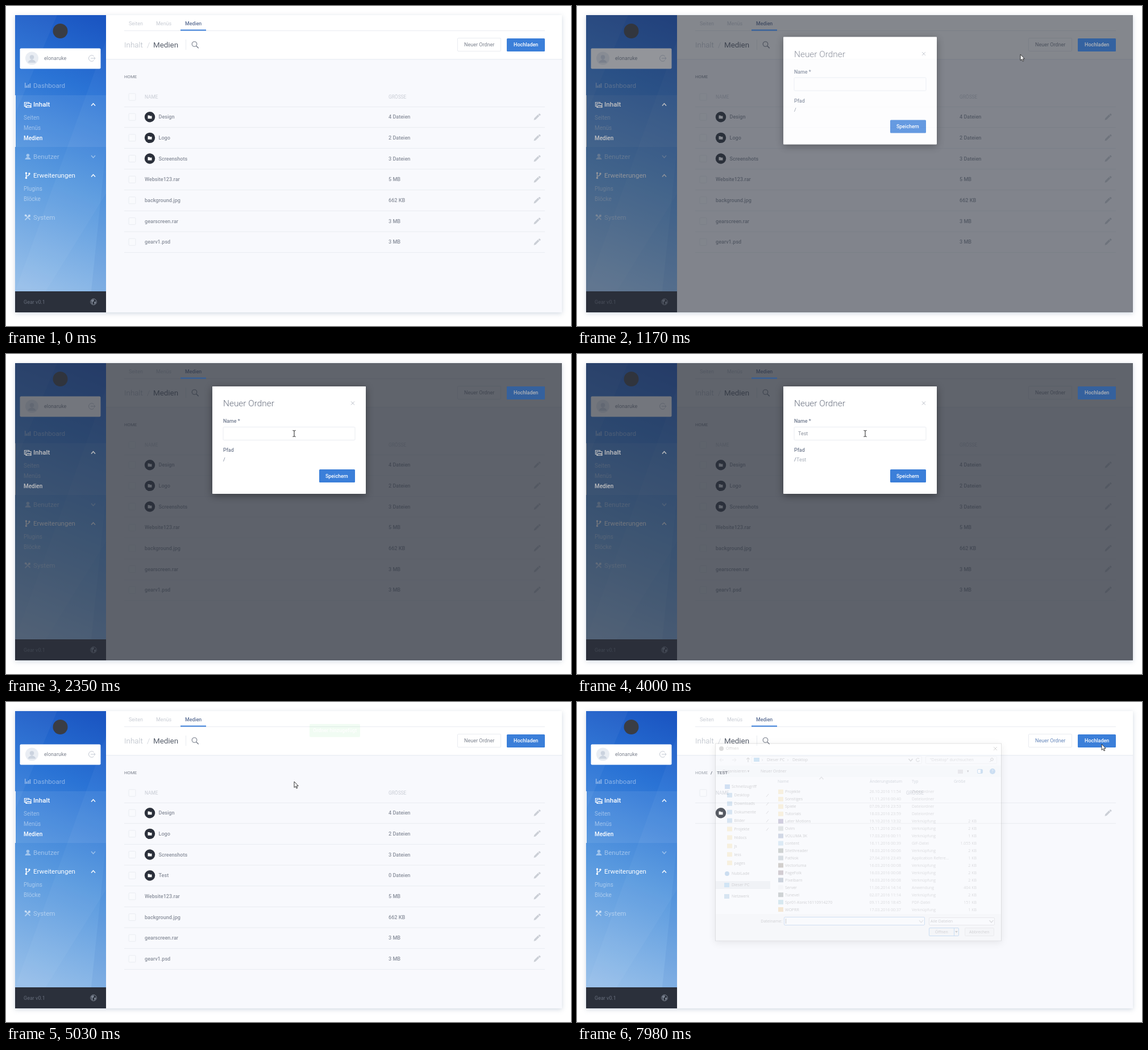
These frames come from a looping animation (994 by 563 pixels, 8 s). An HTML page:

```html
<!DOCTYPE html>
<html lang="de">
<head>
<meta charset="utf-8">
<title>Medien</title>
<style>
  html, body { margin: 0; height: 100%; overflow: hidden; background: #fff; }
  svg { display: block; width: 100vw; height: 100vh; font-family: Roboto, sans-serif; }
  #dialog { font-family: "Open Sans", "Noto Sans", sans-serif; }
  .card { filter: drop-shadow(0 2px 4px rgba(70, 100, 140, .25)); }
  .popup { filter: drop-shadow(0 3px 7px rgba(0, 0, 0, .4)); }
</style>
</head>
<body>
<svg id="stage" viewBox="0 0 994 563"></svg>
<script>
const INK = '#2b303b', BLUE = '#3b7fd9', GREY = '#8a909c', PALE = '#c8ccd4', LINE = '#e9ecf1', DIM = 'rgba(255,255,255,.45)';

// y is the middle of the capital letters
const text = (x, y, s, size, fill, weight = 400, extra = '') =>
  `<text x="${x}" y="${y + size * .355}" font-size="${size}" fill="${fill}" font-weight="${weight}" ${extra}>${s}</text>`;
const rect = (x, y, w, h, fill, extra = '') =>
  `<rect x="${x}" y="${y}" width="${w}" height="${h}" fill="${fill}" ${extra}/>`;
const circle = (x, y, r, fill, extra = '') => `<circle cx="${x}" cy="${y}" r="${r}" fill="${fill}" ${extra}/>`;
const stroke = (d, color, width = 1) => `<path d="${d}" fill="none" stroke="${color}" stroke-width="${width}"/>`;
const fill = (d, color) => `<path d="${d}" fill="${color}"/>`;
const group = (id, body, extra = '') => `<g id="${id}" ${extra}>${body}</g>`;
const box = (x, y, w, h, border, bg = '#fff') => rect(x + .5, y + .5, w - 1, h - 1, bg, `rx="1.5" stroke="${border}"`);
const chevron = (x, y, dir, color) => stroke(`M${x - 3.5} ${y - 2 * dir}l3.5 ${4 * dir}l3.5 ${-4 * dir}`, color, 1.4);
const person = (x, y, s, color) =>
  circle(x, y - 2.2 * s, 2.8 * s, color) + fill(`M${x - 5 * s} ${y + 5 * s}q0 ${-3 * s} ${5 * s} ${-4.5 * s}q${5 * s} ${1.5 * s} ${5 * s} ${4.5 * s}z`, color);

// Elements that stay bright behind the overlay
const bright = () =>
  rect(307, 41.5, 45, 2, BLUE) +
  rect(881, 57, 67, 23, BLUE, 'rx="1.5"') + text(893, 68, 'Hochladen', 9, '#fff', 500) +
  stroke('M34.5 176.5h-2v-7h8v1.5M35 171.500h9v7h-9zM36 178l2.500-3.500 2 2 1.500-1.500 2 3', '#fff', 1.2) +
  text(48, 173, 'Inhalt', 11.6, '#fff', 500) + chevron(153.5, 173.500, -1, '#fff') +
  text(31, 232, 'Medien', 10, '#fff', 500);

const sidebar = () =>
  rect(16, 16, 160, 523, 'url(#sky)') +
  fill('M16 16H90L16 190z', 'rgba(255,255,255,.04)') + fill('M176 60V330L70 502H16z', 'rgba(255,255,255,.035)') +
  fill('M176 250V502H150z', 'rgba(20,80,180,.08)') +
  rect(16, 157, 160, 91, 'rgba(255,255,255,.07)') + rect(16, 157, 1, 91, '#fff') +
  circle(95.5, 44, 13, '#3a3d44') +
  rect(24.5, 74.5, 142, 36, '#fff', 'rx="2"') + circle(45.5, 92, 11.5, '#e9edf3') + person(45.5, 93, 1.35, '#cbd3df') +
  text(67, 92, 'elonaruke', 9, '#7c828e') +
  stroke('M154.500 88.200a5.300 5.300 0 1 0 0 7.600M149 92h8m-2.300-2.300l2.300 2.300-2.300 2.300', '#c3c9d3') +
  fill('M33 135h1.500v9H33zM35.500 140h2v4h-2zM38.500 138h2v6h-2zM41.500 136h1.800v8h-1.800z', DIM) +
  text(48, 140, 'Dashboard', 11.6, DIM) +
  text(31, 196, 'Seiten', 10, DIM) + text(31, 214, 'Menüs', 10, DIM) +
  person(38.5, 265, 1, DIM) + text(48, 265, 'Benutzer', 11.6, DIM) + chevron(153.5, 265, 1, DIM) +
  circle(35.500, 294, 1.7, '#fff') + circle(35.500, 302.500, 1.7, '#fff') + circle(41, 295, 1.7, '#fff') +
  stroke('M35.500 294v8M35.500 299.500q5-.5 5.500-4', '#fff', 1.4) +
  text(48, 298, 'Erweiterungen', 11.6, '#fff') + chevron(153.5, 298.500, -1, '#fff') +
  text(31, 321, 'Plugins', 10, DIM) + text(31, 339, 'Blöcke', 10, DIM) +
  stroke('M33.500 376.500l8-8M34 367.500l8.500 8.500', DIM, 1.8) + circle(41, 369, 2.2, DIM) + circle(34.500, 368.500, 2, DIM) +
  text(48, 371.500, 'System', 11.6, DIM) +
  rect(16, 502, 160, 37, INK) + text(31, 520.500, 'Gear v0.1', 9, '#656c7a') +
  circle(154, 520.500, 5.3, 'none', 'stroke="#7d8593"') +
  fill('M150 517.500l4-1.500 1 3-3 2 1 3-2 .5zM155 521l3-1.500v3l-2.500 2.500z', '#7d8593');

const header = () =>
  rect(176, 16, 802, 77, '#fff') + rect(176, 93, 802, 1.5, '#eceff5') + rect(208, 43, 740, 1, LINE) +
  text(216, 30.500, 'Seiten', 9, PALE) + text(264, 30.500, 'Menüs', 9, PALE) + text(315, 30.500, 'Medien', 8.8, '#5f7196', 500) +
  text(208, 68, 'Inhalt', 13.4, '#b3b9c3', 300) + text(248, 68, '/', 13.4, PALE, 300) + text(259, 68, 'Medien', 13.4, '#575e6b') +
  rect(316, 59, 1, 18, LINE) + circle(331.500, 67, 4.3, 'none', 'stroke="#737a87" stroke-width="1.1"') +
  stroke('M334.700 70.200l4 4', '#737a87', 1.3) +
  box(794, 56, 77, 24, LINE) + text(806, 68, 'Neuer Ordner', 9, '#7b818d', 400, 'id="newFolder"');

const folder = (x, y) => circle(x, y, 9.200, INK) + fill(`M${x - 3.500} ${y - 2.800}h2.800l1 1h3.200v4.800h-7z`, '#fff');
const pencil = y => fill(`M928.500 ${y + 5.500}l.8-3.300 6.500-6.500 2.500 2.500-6.500 6.500zM936.500 ${y - 4.500}l1.200-1.200q1-.6 1.800.2l.6.6q.8.8.2 1.700l-1.200 1.200z`, '#cbcfd6');

function table(rows, sizeX) {
  const check = y => box(215.500, y - 6.500, 13, 13, LINE, '#f9fafd');
  let out = check(160) + text(244, 160, 'NAME', 8.4, PALE) + text(sizeX, 160, 'GRÖSSE', 8.4, PALE) + rect(208, 177, 740, 1, LINE);
  rows.forEach(([name, size], i) => {
    const y = 195.200 + i * 36.670, isFolder = !name || size.endsWith('Dateien');
    if (name) out += check(y);
    if (isFolder) out += folder(253, y);
    out += text(isFolder ? 268.500 : 244, y, name, 9.05, GREY, 500) + text(sizeX, y, size, 9.05, GREY, 500) +
      pencil(y) + rect(208, y + 18, 740, 1, LINE);
  });
  return out;
}
const folders = [['Design', '4 Dateien'], ['Logo', '2 Dateien'], ['Screenshots', '3 Dateien']];
const files = [['Website123.rar', '5 MB'], ['background.jpg', '662 KB'], ['gearscreen.rar', '3 MB'], ['gearv1.psd', '3 MB']];
const home = text(208, 124, 'HOME', 7.8, '#757b87');

const modal = () =>
  rect(363, 57, 270, 189, '#fff', 'rx="2" class="popup"') +
  text(382, 87, 'Neuer Ordner', 15.4, '#6a7180', 300) + stroke('M607 83.500l6 6m0-6l-6 6', '#b9bec7') +
  text(382, 118, 'Name *', 8.9, '#717b8f', 500) + box(381.500, 128, 233, 24, LINE) +
  text(389, 140, '', 9, GREY, 400, 'id="typed"') + rect(389, 135, 1, 11, '#555', 'id="caret"') +
  text(382, 169, 'Pfad', 8.9, '#717b8f', 500) + text(382, 185.500, '/', 9, '#717b8f') +
  text(386, 185.500, '', 9, '#a9b0ba', 400, 'id="path"') +
  rect(551, 203, 63, 23, BLUE, 'rx="1.500"') + text(562, 214.500, 'Speichern', 8.9, '#fff', 500);

// name | date | type (default: link) | size | icon colour
const entries = `Projekte|26.10.2016 11:54|Dateiordner
Sonstiges|11.11.2016 00:40|Dateiordner
Spiele|07.09.2016 23:53|Dateiordner
Tutorials|18.03.2016 23:59|Dateiordner
Later Motions|19.10.2016 13:32||2 KB|#3b2a6a
Ovim|15.11.2016 20:43||2 KB|#8a9a94
VOLUMA 3K|17.03.2016 00:11||1 KB|#3b5b8c
content|16.11.2016 00:39|GIF-Datei|1.055 KB|#6fb4d8
Sitethreader|18.03.2016 00:06||2 KB|#2d3b2d
PatNok|27.04.2016 23:49|Application Refere...|1 KB|#5a7080
Vectorluma|16.03.2016 00:08||2 KB|#3a2a10
PageFolk|16.03.2016 00:08||2 KB|#40202c
Pixelbarn|16.03.2016 00:08||2 KB|#1d3b5c
Server|11.06.2014 14:14|Anwendung|404 KB|#e8e8e8
Tunevel|02.07.2016 11:14||2 KB|#30403a
Spr01-Konic16110914270|09.11.2016 18:45|PDF-Datei|151 KB|#5aa8c0
WOPRR|17.03.2016 00:37||1 KB|#e0a030`.split('\n').map(s => s.split('|'));
const places = 'Schnellzugriff,Desktop,Downloads,Dokumente,Bilder,Projekte,htdocs,js,less,pages'.split(',');

function dialog() {
  const t = (x, y, s, color = '#333', extra) => text(x, y, s, 7, color, 400, extra);
  const icon = (x, y, color) => rect(x, y - 4, 9, 8, color);
  let out = rect(243.500, 73, 503, 347, '#fff', 'stroke="#777" class="popup"') +
    circle(254, 82, 4, '#555') + t(262, 82, 'Öffnen') + stroke('M733 79l6 6m0-6l-6 6', '#333') +
    stroke('M258 102h-7l3-3m-3 3l3 3M273 102h7l-3-3m3 3l-3 3', '#bbb') + stroke('M301 106v-8l-3 3m3-3l3 3', '#444') +
    box(307, 95, 300, 14, '#ddd') + rect(311, 98, 10, 7, '#3a9ad8') + t(325, 102, '›') + t(334, 102, 'Dieser PC') + t(370, 102, '›') + t(379, 102, 'Desktop') +
    chevron(587, 102, 1, '#666') + stroke('M602 100a3 3 0 1 0 .5 3', '#555') +
    box(613, 95, 126, 14, '#ddd') + t(621, 102, '"Desktop" durchsuchen', '#777') +
    circle(730, 101, 2.300, 'none', 'stroke="#555"') + stroke('M728.500 103l-2.500 2.500', '#555') +
    rect(244, 112, 502, 20, '#f3f5f8') + t(256, 122, 'Organisieren ▾') + t(323, 122, 'Neuer Ordner') +
    rect(670, 119, 9, 7, '#aaa') + t(686, 122, '▾') + box(704, 118, 10, 8, '#2a80c8') + rect(710, 119, 3, 6, '#2a80c8') +
    circle(731, 122, 5, '#1f78c8') + t(729.500, 122, '?', '#fff') +
    chevron(430, 134, -1, '#999') +
    t(353, 140, 'Name', '#456') + t(515, 140, 'Änderungsdatum', '#456') + t(589, 140, 'Typ', '#456') + t(663, 140, 'Größe', '#456');
  places.forEach((name, i) => {
    const y = 149 + i * 14.900;
    out += icon(i ? 264 : 260, y, i && i < 5 ? '#5a9ac8' : i ? '#f5cf6a' : '#3a80d0') + t(i ? 276.500 : 272, y, name);
    if (i && i < 6) out += stroke(`M333 ${y + 3}l4-5`, '#777');
  });
  out += rect(244, 315, 96, 14, '#d5d9de') + circle(264, 302, 4, '#1f70c0') + t(272, 302, 'NubiLade') +
    icon(259, 322, '#3a9ad8') + t(272, 322, 'Dieser PC') + icon(259, 342, '#5a9ac8') + t(272, 342, 'Netzwerk');
  entries.forEach(([name, date, type, size = '', color = '#f5cf6a'], i) => {
    const y = 158 + i * 12.940;
    out += icon(354, y, color) + t(366, y, name) + t(514.500, y, date, '#666') +
      t(589, y, type || 'Verknüpfung', '#666') + t(703, y, size, '#666', 'text-anchor="end"');
  });
  return out + rect(244, 373, 502, 46.500, '#f0f0f0') +
    t(361, 385.500, 'Dateiname:', '#333', 'text-anchor="end"') + box(364, 378, 248, 15, '#3a80d0') + rect(367, 381, 1, 9, '#222') +
    chevron(605.500, 386, 1, '#999') + box(619, 379, 116, 14, '#aaa') + t(622, 385.500, 'Alle Dateien') + chevron(729, 386, 1, '#777') +
    box(619, 397, 53, 15, '#1f78d0', '#e6e6e6') + t(630, 404.500, 'Öffnen') + rect(663, 398, 1, 13, '#1f78d0') + fill('M665 403h5l-2.500 3z', '#222') +
    box(682, 397, 52, 15, '#bbb', '#e6e6e6') + t(690, 404.500, 'Abbrechen');
}

stage.innerHTML = `<defs>
  <linearGradient id="sky" gradientUnits="userSpaceOnUse" x1="20" y1="490" x2="200" y2="40">
    <stop stop-color="#97bfe9"/><stop offset=".4" stop-color="#5a9adf"/><stop offset=".75" stop-color="#2a73d5"/><stop offset="1" stop-color="#1b56c2"/>
  </linearGradient>
  <clipPath id="frame"><rect x="16" y="16" width="962" height="523"/></clipPath></defs>` +
  rect(16, 16, 962, 523, '#f8f9fd', 'class="card"') +
  group('app',
    rect(176, 16, 802, 523, '#f8f9fd') + header() + sidebar() + bright() +
    group('before', home + table([...folders, ...files], 673)) +
    group('after', home + table([...folders, ['Test', '0 Dateien'], ...files], 673)) +
    group('inside', text(208, 124, 'HOME', 7.8, '#9da3ad') + text(235, 124, '/', 8, '#555c69', 500) +
      text(246, 124, 'TEST', 8, '#555c69', 500) + table([['', '']], 579)) +
    group('toast', rect(534, 56.500, 89, 23, '#42d957', 'rx="2"') + text(540, 68, 'Ordner hinzugefügt', 8.950, '#fff', 500)) +
    group('overlay', rect(16, -100, 160, 739, INK, 'opacity=".66"') +
      `<path d="M176-100H978V639H176ZM363 57H633V246H363Z" fill="${INK}" fill-rule="evenodd" opacity=".75"/>`) +
    group('lit', bright()) + group('modal', modal()), 'clip-path="url(#frame)"') +
  group('dialog', dialog()) +
  group('cursor',
    group('arrow', '<path d="M0 0V10.500L2.400 8.300 4 12 5.700 11.300 4.100 7.700H7.300Z" fill="#fff" stroke="#222" stroke-width=".9"/>') +
    group('beam', stroke('M-2.500-5.500Q0-5.500 0-4.500Q0-5.500 2.500-5.500M0-5V5M-2.500 5.500Q0 5.500 0 4.500Q0 5.500 2.500 5.500', '#222')) +
    group('hand', '<path d="M-1.200 1Q0-1 1.200 1V5.500Q3 5 3.500 6Q5 5.800 5.300 7Q6.800 7 6.600 9L5.500 14.500H-.5L-4.500 9.500Q-4.500 7.500-2.500 8.500L-1.200 9.700Z" fill="#fff" stroke="#222" stroke-width=".9"/>'));

const $ = id => document.getElementById(id);
const show = (id, on) => $(id).style.display = on ? '' : 'none';
const fade = (id, alpha) => { $(id).setAttribute('opacity', alpha); show(id, alpha > 0); };
const move = (id, x, y) => $(id).setAttribute('transform', `translate(${x} ${y})`);
const linear = u => u, smooth = u => u * u * (3 - 2 * u);

// Value at time t from [time, value] keys
function track(t, keys, ease = linear) {
  const i = keys.findIndex(k => k[0] > t);
  if (i === 0) return keys[0][1];
  if (i < 0) return keys[keys.length - 1][1];
  const [t0, a] = keys[i - 1], [t1, b] = keys[i];
  return a + (b - a) * ease((t - t0) / (t1 - t0));
}

const bursts = [[140, 780, 9], [1010, 1640, 9], [4470, 4720, 4], [5030, 5410, 6], [5570, 6340, 11], [6820, 7590, 11], [7680, 7680, 1], [7820, 7980, 3]];
function snap(t) {
  const burst = bursts.filter(b => b[0] <= t).pop();
  if (!burst) return 0;
  const [start, end, steps] = burst, gap = (end - start) / (steps - 1);
  return t >= end ? end : start + gap * Math.floor((t - start + 10) / gap);
}

const pointer = [[60, 914, 530], [780, 826, 76], [1060, 826, 76], [1510, 507, 140], [5500, 507, 140],
  [6340, 270, 304], [6750, 270, 304], [7590, 938, 78], [7679, 938, 78], [7680, 923, 74]];
const alphaKeys = [[1010, 0], [1089, .135], [1167, .77], [1246, 1], [4390, 1], [4470, .85], [4553, .47], [4637, .13], [4720, 0]];
const keyTimes = [2900, 3050, 3230, 3450];

function draw(now) {
  const raw = now % 8000, t = snap(raw);
  show('before', raw < 4470);
  show('after', raw >= 4470 && raw < 6570);
  show('inside', raw >= 6570);

  const alpha = track(t, alphaKeys), drop = track(t, [[1089, -55], [1167, -2.5], [1246, 0]]);
  fade('overlay', alpha);
  fade('modal', alpha);
  fade('lit', alpha * .5);
  move('overlay', 0, drop);
  move('modal', 0, drop);

  const typed = 'Test'.slice(0, keyTimes.filter(k => k <= raw).length);
  $('typed').textContent = $('path').textContent = typed;
  $('caret').setAttribute('x', 389 + (typed && alpha ? $('typed').getComputedTextLength() : 0));
  show('caret', raw >= 1810 && raw < 2350 || raw >= 2900 && raw < 4000 || raw >= 4530);

  const toast = track(t, [[4960, 0], [5410, 1], [7050, 1], [7450, 0]], smooth);
  fade('toast', toast);
  move('toast', 0, -19 * (1 - toast));
  $('newFolder').setAttribute('fill', t > 7400 ? '#6486bb' : '#7b818d');
  fade('dialog', track(t, [[7820, 0], [7900, .06], [7980, .2]]));

  const x = track(t, pointer, smooth), y = track(t, pointer.map(p => [p[0], p[2]]), smooth);
  const beam = alpha > 0 && x < 614 && y > 128, hand = raw < 6570 && x < 287 && y > 290;
  show('cursor', raw >= 140);
  move('cursor', x, y);
  show('beam', beam);
  show('hand', hand);
  show('arrow', !beam && !hand);
}

const begin = performance.now();
function loop() {
  draw(performance.now() - begin);
  requestAnimationFrame(loop);
}
loop();
</script>
</body>
</html>
```
